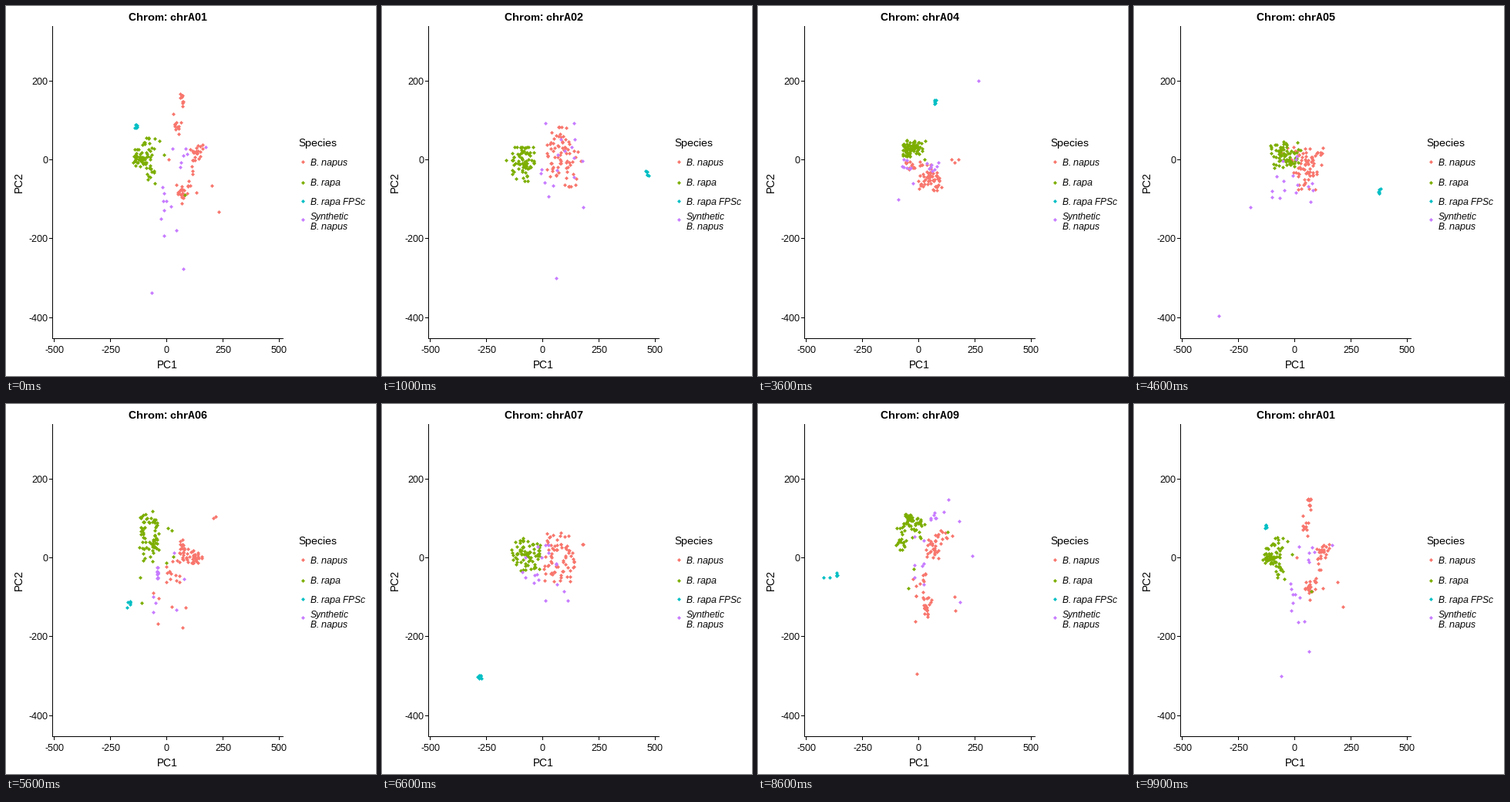
A matplotlib script for the animation above (10 s loop, 480 by 480 pixels).

```python
import matplotlib.pyplot as plt
import numpy as np
from matplotlib.animation import FuncAnimation

SIZE, DPI = 480, 100
PX = 72 / DPI
COUNTS = [74, 76, 6, 18]
COLORS = ["#F8766D", "#7CAE00", "#00BFC4", "#C77CFF"]
STATES, STEPS, HOLD = 10, 10, 5

rng = np.random.default_rng(7)


def blob(n, cx, cy, sx, sy):
    """A loose cluster of n points, in stage pixels."""
    spread = np.clip(rng.normal(size=(n, 2)), -1.6, 1.6)
    return [cx, cy] + spread * [sx, sy]


def cloud(n, parts):
    """Single points (x, y) first, the rest of n shared among the blobs."""
    spots = [p for p in parts if len(p) == 2]
    blobs = [p for p in parts if len(p) == 4]
    rest = n - len(spots)
    groups = [blob((rest + i) // len(blobs), *b) for i, b in enumerate(blobs)]
    return np.vstack([np.reshape(spots, (-1, 2)), *groups])


def pose(*species):
    return np.vstack([cloud(n, parts) for n, parts in zip(COUNTS, species)])


def ease(u):
    return 2 * u * u if u < 0.5 else 1 - 2 * (1 - u) ** 2


def leaving(seen, target):
    """Resting pose whose first step towards target gives the seen pose."""
    e = ease(0.2)
    return (seen - e * target) / (1 - e)


# Each pose lists B. napus, B. rapa, B. rapa FPSc and synthetic B. napus.
chr1 = pose(
    [(275, 267), (266, 233), (210, 199), (216, 140), (228, 122, 2, 6),
     (223, 158, 3, 9), (247, 188, 5, 5), (245, 191, 5, 6), (228, 240, 5, 5),
     (226, 245, 4, 7), (241, 222, 4, 14)],
    [(198, 175), (204, 193), (231, 245), (169, 199, 3, 5), (174, 200, 5, 7),
     (176, 197, 6, 7), (184, 185, 5, 9), (186, 212, 4, 12)],
    [(168, 155, 1, 2)],
    [(188, 372), (229, 341), (204, 298), (220, 291), (204, 252, 6, 15),
     (237, 190, 14, 22)])

chr2 = pose(
    [(235, 205, 14, 18), (228, 195, 9, 24)],
    [(160, 200), (182, 205, 9, 14)],
    [(343, 215, 2, 3)],
    [(225, 353), (225, 205, 22, 35)])

chr3 = pose(
    [(245, 137), (208, 216), (186, 170), (226, 150, 2, 7), (243, 172, 4, 8),
     (238, 189, 3, 6), (257, 179, 2, 5), (226, 230, 6, 13), (240, 230, 6, 10)],
    [(190, 174), (193, 196), (230, 201), (165, 178, 4, 4), (169, 188, 3, 7),
     (179, 192, 5, 8), (180, 208, 4, 4), (211, 244, 4, 10)],
    [(164, 230, 1.5, 1.5)],
    [(176, 45), (235, 322), (246, 120), (179, 168, 6, 9), (233, 180, 8, 10),
     (196, 261, 12, 5)])

chr5 = pose(
    [(215, 205, 18, 14), (222, 215, 12, 16)],
    [(195, 195, 12, 10)],
    [(330, 240, 2, 3)],
    [(147, 260), (100, 414), (205, 225, 18, 20)])

chr4 = leaving(pose(
    [(250, 199), (259, 199), (254, 203), (199, 208, 6, 4), (215, 216, 5, 6),
     (226, 221, 5, 4), (232, 230, 3, 6), (216, 230, 6, 5)],
    [(216, 175), (215, 199), (191, 184, 3, 6), (195, 187, 5, 5),
     (206, 183, 4, 7)],
    [(229, 124, 1, 2)],
    [(285, 97), (181, 251), (200, 230), (189, 209, 5, 6), (226, 211, 6, 8)]),
    chr5)

chr7 = pose(
    [(262, 175), (258, 178), (230, 200, 13, 20)],
    [(185, 195, 12, 14)],
    [(119, 364, 2, 3)],
    [(210, 220, 20, 25)])

chr6 = leaving(pose(
    [(271, 146), (268, 148), (196, 285), (228, 290), (214, 263), (232, 264),
     (190, 245), (197, 252), (227, 187, 2, 7), (242, 198, 4, 5),
     (247, 201, 4, 3), (229, 198, 5, 7), (215, 217, 8, 9)],
    [(175, 258), (173, 225), (209, 161), (214, 164), (216, 198), (207, 206),
     (181, 150, 5, 7), (194, 163, 2, 8), (177, 166, 2, 8), (182, 193, 6, 7),
     (191, 181, 4, 5)],
    [(158, 259, 2, 4)],
    [(190, 270), (220, 267), (193, 258), (190, 250), (230, 227), (217, 193),
     (196, 220, 1, 5)]),
    chr7)

chr10 = pose(
    [(218, 205, 14, 14)],
    [(200, 214, 9, 12)],
    [(193, 190, 2, 3)],
    [(213, 135), (191, 91), (304, 108), (212, 170, 12, 22)])

chr9 = leaving(pose(
    [(205, 350), (254, 250), (255, 268), (203, 282), (217, 268, 2, 5),
     (219, 259, 3, 8), (225, 197, 5, 6), (240, 173, 7, 6), (223, 183, 4, 7),
     (208, 237, 5, 14)],
    [(245, 166), (194, 239), (201, 214), (195, 147, 3, 3), (196, 150, 3, 4),
     (209, 152, 4, 4), (185, 166, 4, 7), (184, 183, 4, 6), (200, 164, 6, 8)],
    [(84, 225), (92, 225), (101, 221, 1, 1.5)],
    [(246, 124), (240, 140), (260, 152), (277, 197), (261, 257),
     (227, 145, 3, 3), (212, 217, 6, 28)]),
    chr10)

chr8 = leaving(pose(
    [(234, 267), (275, 229), (213, 171), (231, 177, 2, 8), (223, 182, 4, 9),
     (225, 206, 4, 8), (221, 227, 3, 5), (223, 229, 4, 4), (209, 199, 3, 9)],
    [(207, 216), (192, 219), (213, 184), (184, 181, 2, 4), (188, 185, 4, 6),
     (194, 192, 4, 5), (198, 196, 4, 7)],
    [(185, 242, 1.5, 0.7)],
    [(242, 241), (222, 254), (216, 250), (200, 212, 4, 7), (220, 198, 6, 16)]),
    chr9)

poses = [chr1, chr2, chr3, chr4, chr5, chr6, chr7, chr8, chr9, chr10]

plt.rcParams.update({"font.family": "Liberation Sans",
                     "text.hinting": "native", "text.hinting_factor": 1})
fig = plt.figure(figsize=(SIZE / DPI, SIZE / DPI), dpi=DPI, facecolor="white")
ax = fig.add_axes([0, 0, 1, 1])
ax.axis("off")


def text(x, y, s, size, **style):
    return ax.text(x, y, s, fontsize=size * PX, color="black", **style)


def line(x0, y0, x1, y1):
    """A line through pixel centres, both end pixels included."""
    ax.plot([x0 + 0.5, x1 + 0.5], [y0 + 0.5, y1 + 0.5], color="black", lw=PX,
            antialiased=False, snap=False, solid_capstyle="projecting")


def centres(points):
    return np.round(points) + [0.5, -0.5]


def dots(color, points):
    x, y = centres(np.array(points)).T
    return ax.scatter(x, y, s=(3.5 * PX) ** 2, marker="D", color=color,
                      linewidths=0, antialiased=False, snap=False, zorder=3)


line(60, 26, 60, 431)
line(60, 431, 359, 431)
for i in range(5):
    x = 62 + 73 * i
    line(x, 431, x, 435)
    text(x + 0.5, 450, str(250 * i - 500), 12, ha="center")
for i in range(4):
    y = int(97 + 102.4 * i)
    line(56, y, 60, y)
    text(54.5, y + 5, str(200 - 200 * i), 12, ha="right")
text(209.5, 470, "PC1", 14, ha="center")
text(17, 229, "PC2", 14, ha="center", va="center", rotation=90)
title = text(209.7, 19, "", 14, ha="center", weight="bold")

text(379.5, 182, "Species", 14)
for y, color in zip((202, 229, 253, 277), COLORS):
    dots(color, [(384, y)])
for y, label in [(207, "B. napus"), (233, "B. rapa"), (258, "B. rapa FPSc"),
                 (277, "Synthetic"), (290, "B. napus")]:
    text(395, y, label, 12, style="italic")

cuts = np.cumsum(COUNTS)[:-1]
layers = [dots(color, part)
          for color, part in zip(COLORS, np.split(poses[0], cuts))]
ax.set(xlim=(0, SIZE), ylim=(SIZE, 0))


def draw(frame):
    k, step = divmod(frame, STEPS)
    u = max(0, step - HOLD) / (STEPS - HOLD)
    after = (k + 1) % STATES
    e = ease(u)
    points = centres(poses[k] * (1 - e) + poses[after] * e)
    for layer, part in zip(layers, np.split(points, cuts)):
        layer.set_offsets(part)
    title.set_text(f"Chrom: chrA{(k if u < 0.5 else after) + 1:02d}")
    return [*layers, title]


anim = FuncAnimation(fig, draw, frames=STATES * STEPS, interval=100,
                     repeat=True, repeat_delay=0)
plt.show()
```
